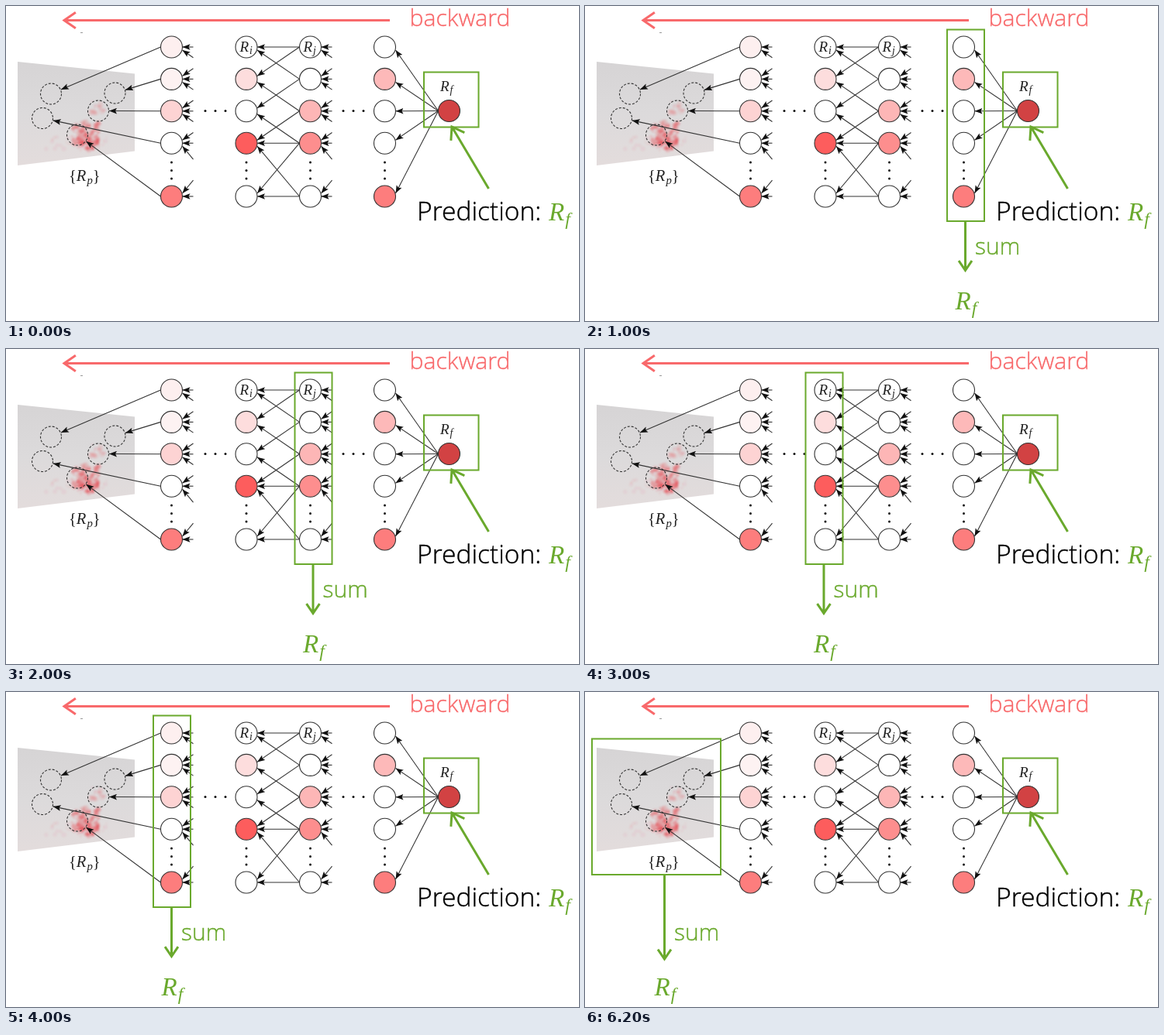
Animation, 739 px wide and 407 px high, one loop 7000 ms. Source, as an HTML page:

```html
<!DOCTYPE html>
<html lang="en">
<head>
<meta charset="utf-8">
<title>Relevance backward pass</title>
<style>
html, body { margin: 0; width: 100%; height: 100%; overflow: hidden; background: #fff; }
svg { display: block; width: 739px; height: 407px; }
.label { font-family: "Open Sans", "Noto Sans", sans-serif; font-weight: 300; stroke-width: .4; }
.math { font-family: "Liberation Serif", "Noto Serif", serif; font-style: italic; }
</style>
</head>
<body>
<svg id="stage" viewBox="0 0 739 407">
  <defs>
    <marker id="head" viewBox="0 0 10 8" refX="10" refY="4" markerWidth="10" markerHeight="8" markerUnits="userSpaceOnUse" orient="auto">
      <path d="M10 4L0 .2L2 4L0 7.8Z" fill="#111"/>
    </marker>
    <linearGradient id="wall" x2="0" y2="1">
      <stop stop-color="#d6d4d5"/><stop offset=".5" stop-color="#dcdadb"/><stop offset="1" stop-color="#e3dcdc"/>
    </linearGradient>
    <filter id="soft"><feGaussianBlur stdDeviation=".9"/></filter>
  </defs>
</svg>
<script>
const stage = document.getElementById('stage');
const GREEN = '#6aa92d', CORAL = '#f8696b', INK = '#333';
const RADIUS = 14, LEAN = 4, LOOP = 7000, STEP = 1000;
const columns = [213.5, 310, 392.5, 488.5];
const rows = Array.from({ length: 5 }, (_, i) => i < 4 ? 53 + 41.4 * i : 246);
const output = { x: 571.5, y: 135.5 };

function add(tag, attrs, parent = stage, text = '') {
  const node = document.createElementNS('http://www.w3.org/2000/svg', tag);
  for (const key in attrs) node.setAttribute(key, attrs[key]);
  node.textContent = text;
  parent.append(node);
  return node;
}

function circle(cx, cy, r, attrs) {
  return add('circle', { cx, cy, r, ...attrs });
}

function neuron(x, y, fill) {
  circle(x, y, RADIUS, { fill, stroke: INK, 'stroke-width': 1.1 });
}

function dots(x, y, dx, dy) {
  for (let i = -1; i <= 1; i++) circle(x + i * dx, y + i * dy, 1.5, { fill: '#111' });
}

function edge(x1, y1, x2, y2) {
  add('path', { d: `M${x1} ${y1}L${x2} ${y2}`, stroke: INK, 'stroke-width': 1.1, 'marker-end': 'url(#head)' });
}

function label(x, y, size, color, text, parent) {
  add('text', { x, y, class: 'label', fill: color, stroke: color, 'font-size': size }, parent, text);
}

function symbol(x, y, size, sub, { parent, color = '#222', open = '', close = '' } = {}) {
  const text = add('text', { x, y, class: 'math', fill: color, 'font-size': size }, parent);
  const drop = size * .18;
  add('tspan', { 'font-style': 'normal' }, text, open);
  add('tspan', {}, text, 'R');
  add('tspan', { dx: 1, dy: drop, 'font-size': size * .72 }, text, sub);
  add('tspan', { dy: -drop, 'font-style': 'normal' }, text, close);
}

function openArrow(x1, y1, x2, y2, color, wing, parent) {
  const angle = Math.atan2(y2 - y1, x2 - x1);
  const barb = turn => `${x2 - wing * Math.cos(angle + turn)} ${y2 - wing * Math.sin(angle + turn)}`;
  add('path', {
    d: `M${x1} ${y1}L${x2} ${y2}M${barb(.6)}L${x2} ${y2}L${barb(-.6)}`,
    fill: 'none', stroke: color, 'stroke-width': 3
  }, parent);
}

function box(x, y, width, height, parent) {
  add('rect', { x, y, width, height, fill: 'none', stroke: GREEN, 'stroke-width': 2 }, parent);
}

function drawInput() {
  add('path', { d: 'M15 72L166 87.5V187.5L15 206Z', fill: 'url(#wall)' });
  const heat = add('g', { filter: 'url(#soft)', fill: '#e8303c' });
  let seed = 7;
  const random = () => (seed = seed * 16807 % 2147483647) / 2147483647;
  const speckle = (count, x, y, width, height, opacity) => {
    for (let i = 0; i < count; i++) {
      const cx = x + (random() - .5) * width, cy = y + (random() - .5) * height;
      add('circle', { cx, cy, r: 1 + 2.5 * random(), opacity }, heat);
    }
  };
  speckle(110, 103, 165, 36, 30, .2);
  speckle(25, 105, 180, 18, 12, .2);
  speckle(20, 118, 131, 18, 18, .1);
  speckle(40, 90, 178, 80, 18, .05);

  const patches = [[58, 113.5], [140.5, 112.5], [47, 145], [119, 135.5], [92, 166.5]];
  const sources = [0, 1, 3, 2, 4];
  patches.forEach(([x, y], i) => {
    circle(x, y, 13.5, { fill: 'none', stroke: INK, 'stroke-width': 1.1, 'stroke-dasharray': '3 2' });
    const startX = columns[0] - RADIUS, startY = rows[sources[i]];
    const angle = Math.atan2(startY - y, startX - x);
    edge(startX, startY, x + RADIUS * Math.cos(angle), y + RADIUS * Math.sin(angle));
  });
}

// Incoming edges from an unseen layer, cut off a quarter of the way along
function drawStubs(x) {
  rows.forEach((y, i) => [-1, 0, 1].forEach(side => {
    const source = rows[i + side];
    if (source === undefined) return;
    const endY = y + side * LEAN;
    edge(x + 2 * RADIUS, endY + (source - endY) * .26, x + RADIUS, endY);
  }));
}

function drawNetwork() {
  rows.forEach((y, from) => rows.forEach((endY, to) => {
    const level = from === to && from !== 1 && from !== 2;
    if (level || Math.abs(from - to) === 1) {
      edge(columns[2] - RADIUS, y, columns[1] + RADIUS, endY + Math.sign(from - to) * LEAN);
    }
  }));
  rows.forEach((y, i) => edge(output.x - RADIUS, output.y, columns[3] + RADIUS, y + Math.sign(2 - i) * LEAN));
  drawStubs(columns[0]);
  drawStubs(columns[2]);

  const relevance = [[.1, .08, .27, 0, .8], [0, .21, 0, 1, 0], [0, 0, .45, .7, 0], [0, .43, 0, 0, .8]];
  columns.forEach((x, c) => {
    rows.forEach((y, i) => {
      const tint = 255 - 162 * relevance[c][i];
      neuron(x, y, `rgb(253 ${tint} ${tint})`.replace('253 255', '255 255'));
    });
    dots(x, 212.5, 0, 10.5);
  });
  neuron(output.x, output.y, '#d24243');
  dots(270, output.y, 13, 0);
  dots(448, output.y, 13, 0);

  symbol(301.5, 59, 19, 'i');
  symbol(383.5, 59, 19, 'j');
  symbol(560, 110, 19, 'f');
  symbol(81, 226, 20.5, 'p', { open: '{', close: '}' });
}

function drawNotes() {
  add('path', { d: 'M96 34.5h3', stroke: '#999' });
  openArrow(495, 18.5, 75, 18.5, CORAL, 18);
  label(520.5, 26, 30.2, CORAL, 'backward');
  box(539, 85.5, 70.5, 71);
  openArrow(622.5, 236, 575, 156, GREEN, 18);
  label(530, 277, 33.6, '#000', 'Prediction:');
  symbol(700, 277, 33, 'f', { color: GREEN });
}

function highlight(index, x, y, width, height, arrowX, arrowLength) {
  const group = add('g', { opacity: 0 });
  const bottom = y + height;
  box(x, y, width, height, group);
  openArrow(arrowX, bottom, arrowX, bottom + arrowLength, GREEN, 15, group);
  label(arrowX + 12.5, 320.5, 30, GREEN, 'sum', group);
  symbol(arrowX - 13, 392, 33, 'f', { parent: group, color: GREEN });

  const start = (index + 1) * STEP;
  const end = index === columns.length ? LOOP : start + STEP;
  const frames = [[0, 0], [start, 1], [end, 0], [LOOP, 0]]
    .map(([time, opacity]) => ({ opacity, offset: time / LOOP, easing: 'step-end' }));
  group.animate(frames, { duration: LOOP, iterations: Infinity });
}

drawInput();
drawNetwork();
drawNotes();
[467, 372.5, 284.5, 190].forEach((x, i) => highlight(i, x, 30.5, 48, 247.5, x + 23.5, 63.5));
highlight(columns.length, 9, 60.5, 166, 175.5, 102.5, 109);
</script>
</body>
</html>
```
